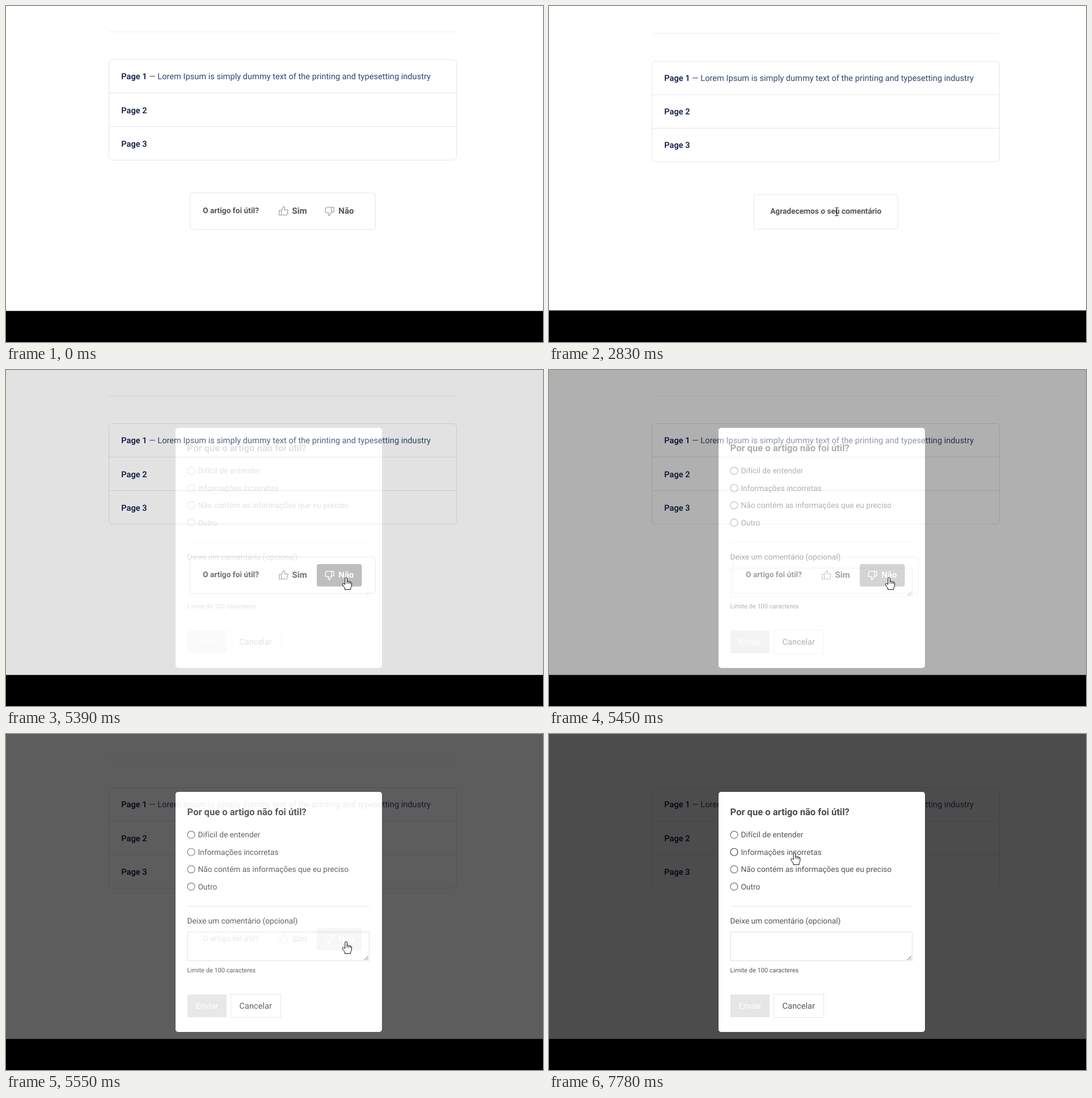
An HTML page for the animation above (8 s loop, 947 by 592 pixels).

```html
<!DOCTYPE html>
<html lang="pt">
<head>
<meta charset="utf-8">
<title>Feedback do artigo</title>
<style>
  html, body { margin: 0; width: 100%; height: 100%; overflow: hidden; background: #fff; }
  svg { display: block; width: 100%; height: 100%; }
  text { font: 13.73px Roboto, sans-serif; fill: #555; text-rendering: geometricPrecision; }
  .bold { font-weight: 700; }
  .big { font-size: 14.64px; }
  .page { font-weight: 500; fill: #06113f; }
  .page tspan { font-weight: 400; fill: #34456e; }
  .mid { text-anchor: middle; }
  .box { fill: none; stroke: #e3e5e9; }
  .icon { fill: none; stroke: #aaa; stroke-width: 1.4; stroke-linejoin: round; }
  .hover text { fill: #fff; }
  .hover .icon { stroke: #fff; }
  .radio { fill: #fff; stroke: #747474; stroke-width: 1.2; }
  .cursor { fill: #fff; stroke: #000; stroke-linejoin: round; }
</style>
</head>
<body>
<svg viewBox="0 0 947 592">
  <defs>
    <path id="thumb" d="M-7.6-.8h4v8.2h-4zM-3.6-.6L.2-7.6c1.5 0 2.3 1 2 2.5L1.6-2h4.6c1 0 1.6.8 1.4 1.7l-1.1 6.2c-.2 1-.8 1.5-1.7 1.5h-8.4"/>
    <g id="yes">
      <use href="#thumb" class="icon" x="489.3" y="361"/>
      <text class="bold" style="font-size:15px" x="504.6" y="366">Sim</text>
    </g>
    <g id="no">
      <use href="#thumb" class="icon" transform="translate(570.6 362) rotate(180)"/>
      <text class="bold" style="font-size:15px" x="586.3" y="366">Não</text>
    </g>
  </defs>

  <g id="list">
    <path class="box" style="stroke:#eee" d="M181 45.5H795"/>
    <rect class="box" x="181.5" y="94.5" width="613" height="177" rx="6"/>
    <path class="box" d="M182 153.5H794M182 212.5H794"/>
    <text class="page big" x="203.3" y="129.4">Page 1 <tspan>— Lorem Ipsum is simply dummy text of the printing and typesetting industry</tspan></text>
    <text class="page big" x="203.3" y="188.5">Page 2</text>
    <text class="page big" x="203.3" y="247.6">Page 3</text>
  </g>

  <g id="question">
    <rect class="box" x="324.5" y="329.5" width="327" height="64" rx="4"/>
    <text class="bold" x="347" y="365.4">O artigo foi útil?</text>
    <use href="#yes"/>
    <use href="#no"/>
    <g id="yesHover" class="hover">
      <rect x="466.5" y="342" width="78.5" height="39.5" rx="4" fill="#b2b2b2"/>
      <g id="yesLabel"></g>
    </g>
    <g id="noHover" class="hover">
      <rect x="548" y="342" width="79.5" height="39.5" rx="4" fill="#b2b2b2"/>
      <g id="noLabel"></g>
    </g>
  </g>

  <g id="thanks">
    <rect class="box" x="361" y="332.5" width="254.5" height="60.5" rx="4"/>
    <text class="bold mid" x="488.2" y="366.4">Agradecemos o seu comentário</text>
  </g>

  <rect id="footer" width="947" height="60"/>
  <path id="backdrop" fill-rule="evenodd" d="M0 0H947V592H0zM304 102H658a5 5 0 0 1 5 5V520a5 5 0 0 1-5 5H304a5 5 0 0 1-5-5V107a5 5 0 0 1 5-5z"/>

  <g id="modal">
    <rect x="299" y="102" width="364" height="423" rx="5" fill="#fff"/>
    <text class="bold" style="font-size:16.5px;fill:#4a4a4a" x="319.6" y="143">Por que o artigo não foi útil?</text>
    <g id="options"></g>
    <path class="box" d="M320 303.5H641"/>
    <text x="319.6" y="334.3">Deixe um comentário (opcional)</text>
    <rect class="box" style="stroke:#e0e0e0" x="320.5" y="349" width="320" height="50.5"/>
    <path d="M632 398l7-7M636 398l3-3" stroke="#555"/>
    <text style="font-size:11px" x="319.6" y="420">Limite de 100 caracteres</text>
    <rect x="320" y="459" width="69" height="40" fill="#e6e6e6"/>
    <text class="big mid" style="fill:#fff" x="354.5" y="483.8">Enviar</text>
    <rect class="box" style="stroke:#e6e6e6" x="396.5" y="458.5" width="88" height="41"/>
    <text class="big mid" x="440.2" y="483.8">Cancelar</text>
  </g>

  <g id="arrow" class="cursor"><path d="M.5.5V15.5l3.4-3.3 2.3 5.3 2.1-.9-2.3-5.2h4.8z"/></g>
  <g id="hand" class="cursor">
    <path d="M-1.8 12.5V2.2a1.8 1.8 0 0 1 3.6 0V7.5c.5-1 2.8-.9 3 .5.6-.8 2.6-.6 2.8.7.8-.6 2.2-.2 2.2 1.3V14c0 2.5-1.5 3.5-1.7 5v2.5H-2.2v-2C-2.8 17.5-6 14.5-6.3 12.3c-.2-1.6 1.7-2 2.7-.8z"/>
    <path fill="none" d="M1.8 7.5V11M4.8 8v3.3M7.6 8.7v2.9"/>
  </g>
  <g id="beam" class="cursor"><path fill="none" d="M-3-7h2q1 0 1 1q0-1 1-1h2M0-6.5v13M-3 7h2q1 0 1-1q0 1 1 1h2"/></g>
</svg>

<script>
const LOOP = 8000;
const $ = id => document.getElementById(id);
const show = (id, on) => $(id).style.display = on ? '' : 'none';
const clamp = v => Math.min(1, Math.max(0, v));
const progress = (t, start, length) => clamp((t - start) / length);

const linear = p => p;
const easeIn = p => p * p;
const easeOut = p => 1 - (1 - p) ** 3;
const easeInOut = p => p < .5 ? 2 * p * p : 1 - 2 * (1 - p) ** 2;

// Hovered labels are separate copies so their colours can differ.
for (const id of ['yes', 'no'])
  for (const part of $(id).children) $(id + 'Label').append(part.cloneNode(true));

const options = [
  ['Difícil de entender', 449],
  ['Informações incorretas', 481],
  ['Não contém as informações que eu preciso', 604],
  ['Outro', 373],
].map(([label, right], i) => ({ label, right, y: 177.6 + 30.4 * i }));

$('options').innerHTML = options.map(({ label, y }) =>
  `<circle class="radio" cx="326.5" cy="${y}" r="6.5"/><text x="338.4" y="${y + 4.7}">${label}</text>`).join('');
const radios = document.querySelectorAll('.radio');

// Pointer moves: start, end, from x, y, to x, y, easing.
const moves = [
  [1190, 1690, 568, 588, 508, 361.5, easeOut],
  [2830, 2831, 507.5, 362.5, 507.5, 362.5, linear],
  [2870, 2871, 508.5, 362.5, 508.5, 362.5, linear],
  [3070, 3530, 508.5, 362.5, 577, 596, easeIn],
  [4500, 5080, 612, 590, 599.7, 365.3, easeOut],
  [5710, 5711, 602.5, 366, 602.5, 366, linear],
  [6440, 6441, 603.5, 366, 603.5, 366, linear],
  [6610, 7320, 603.5, 366, 442, 178, easeInOut],
  [7520, 7780, 442, 178, 433, 208.7, easeInOut],
];

function pointerAt(t) {
  const move = moves.findLast(m => m[0] <= t);
  if (!move) return [-50, -50];
  const [start, end, x0, y0, x1, y1, ease] = move;
  const p = ease(progress(t, start, end - start));
  return [x0 + (x1 - x0) * p, y0 + (y1 - y0) * p];
}

const inside = (x, y, left, top, right, bottom) =>
  x >= left && x <= right && y >= top && y <= bottom;

function cursorAt(t, x, y, option) {
  if (t >= 5710) {
    if (option >= 0) return 'hand';
    return inside(x, y, 320, 349, 641, 400) ? 'beam' : 'arrow';
  }
  if (t >= 2530 && t < 4000) return inside(x, y, 390, 353, 586, 371) ? 'beam' : 'arrow';
  return inside(x, y, 466, 342, 545, 381.5) || inside(x, y, 548, 342, 627, 381.5) ? 'hand' : 'arrow';
}

function draw(t) {
  const thanked = t >= 2390 && t < 4000;
  show('question', !thanked);
  show('thanks', thanked);
  $('list').setAttribute('transform', `translate(0 ${thanked ? 2.8 : 0})`);
  $('footer').setAttribute('y', thanked ? 536.4 : 537.3);
  $('yesHover').style.opacity = t < 2390 ? progress(t, 1490, 150) : 0;
  $('noHover').style.opacity = progress(t, 4870, 150);

  const fade = easeInOut(progress(t, 5300, 320));
  $('backdrop').style.opacity = .7 * fade;
  $('modal').style.opacity = fade;

  const [x, y] = pointerAt(t);
  const option = t < 5710 ? -1 : options.findIndex(o => inside(x, y, 320, o.y - 11, o.right, o.y + 11));
  radios.forEach((radio, i) => radio.style.stroke = i === option ? '#444' : '');

  const cursor = cursorAt(t, x, y, option);
  for (const id of ['arrow', 'hand', 'beam']) show(id, id === cursor);
  $(cursor).setAttribute('transform', `translate(${x} ${y})`);
}

const begin = performance.now();
function tick() {
  draw((performance.now() - begin) % LOOP);
  requestAnimationFrame(tick);
}
tick();
</script>
</body>
</html>
```
